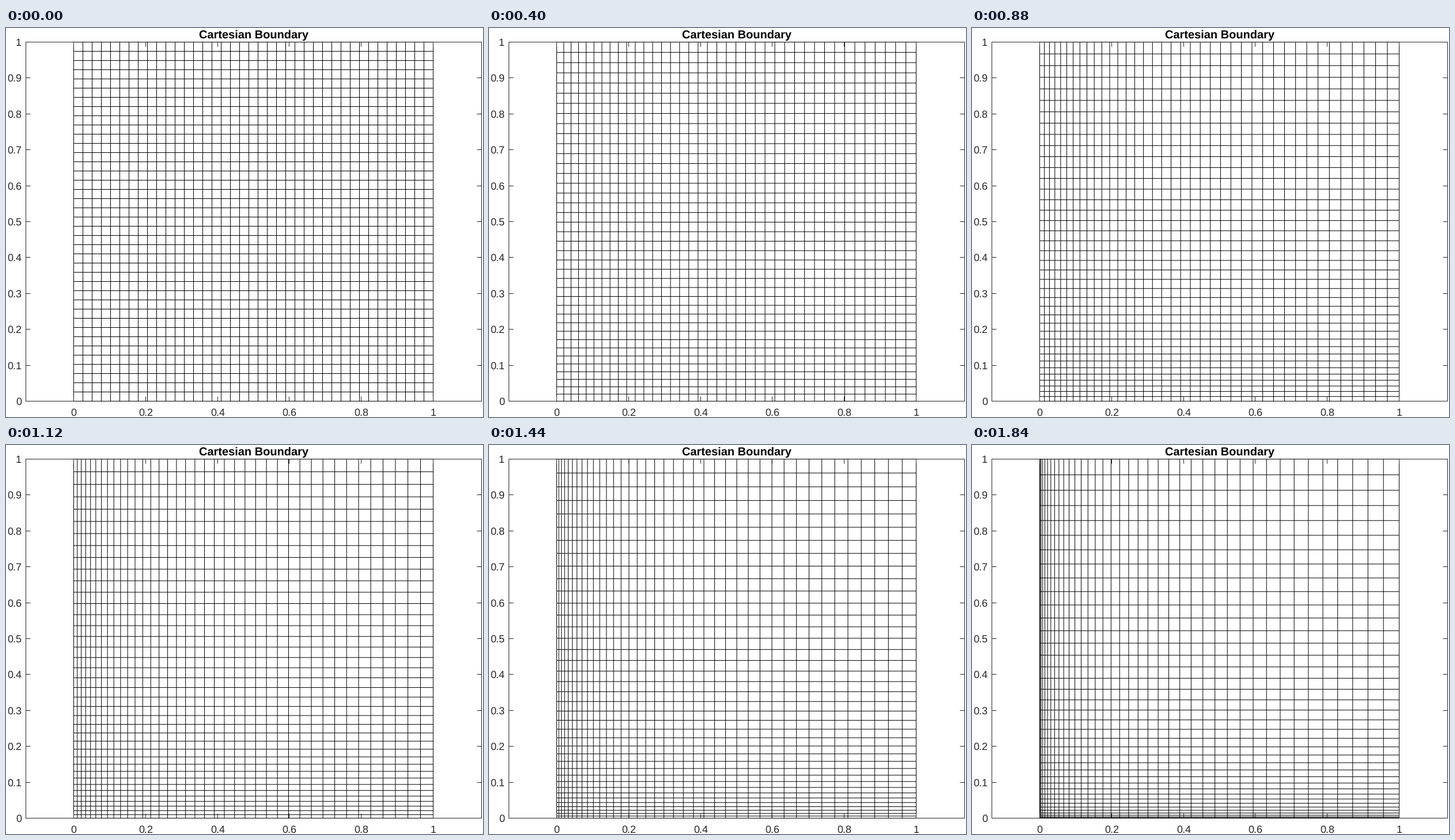
These frames come from a looping animation (828x676 px, 1920 ms). A matplotlib script:

```python
import numpy as np
import matplotlib.pyplot as plt
from matplotlib.animation import FuncAnimation

W, H, DPI = 828, 676, 64
PX = 72 / DPI                       # points per pixel
FRAMES, INTERVAL = 24, 80
CELLS = 39
LEFT, RIGHT, TOP, BOTTOM = 34.5, 825.5, 24.5, 648.5
X0, SIZE = 117.5, 624
INK = "#262626"

plt.rcParams["font.family"] = "Liberation Sans"
plt.rcParams["text.hinting"] = "none"
fig = plt.figure(figsize=(W / DPI, H / DPI), dpi=DPI, facecolor="white")
ax = fig.add_axes([0, 0, 1, 1])
ax.set_xlim(0, W)
ax.set_ylim(H, 0)
ax.axis("off")


def stroke(xs, ys, color, z):
    # Snapping would push half-pixel positions onto the next pixel.
    line, = ax.plot(xs, ys, color=color, lw=PX, zorder=z, snap=False,
                    solid_capstyle="butt", solid_joinstyle="miter")
    return line


def label(x, y, text, size, **kw):
    ax.text(x, y, text, fontsize=size * PX, va="baseline", **kw)


def spacing(t):
    """Node positions on [0, 1], drawn towards 0 as t grows."""
    u = np.linspace(0, 1, CELLS + 1)
    start = 1.15 - u + 0.34 * u**2
    end = 0.985 - 0.268 * u
    return u - t * u * (1 - u) * ((1 - t) * start + t * end)


def segments(pos, lo, hi):
    """Parallel lines at pos from lo to hi, separated by gaps."""
    gap = np.full_like(pos, np.nan)
    along = np.column_stack([pos, pos, gap]).ravel()
    across = np.tile([lo, hi, np.nan], len(pos))
    return along, across


# Axes box, inward ticks and labels
stroke([LEFT, RIGHT, RIGHT, LEFT, LEFT], [TOP, TOP, BOTTOM, BOTTOM, TOP], INK, 1)
for v in np.linspace(0, 1, 11):
    y = np.floor(BOTTOM - SIZE * v) + 0.5
    stroke([LEFT, LEFT + 8], [y, y], INK, 3)
    stroke([RIGHT - 8, RIGHT], [y, y], INK, 3)
    label(27, y + 6.5, f"{v:.1g}", 18, ha="right", color=INK)
for v in np.linspace(0, 1, 6):
    x = np.floor(X0 + SIZE * v) + 0.5
    stroke([x, x], [TOP, TOP + 8], INK, 3)
    stroke([x, x], [BOTTOM - 8, BOTTOM], INK, 3)
    label(x, 673.5, f"{v:.1g}", 18, ha="center", color=INK)
label(429.7, 17.5, "Cartesian Boundary", 20, ha="center",
      color="black", weight="bold")

columns = stroke([], [], "black", 2)
rows = stroke([], [], "black", 2)


def update(k):
    pos = SIZE * spacing(k / (FRAMES - 1))
    columns.set_data(*segments(X0 + pos, TOP, BOTTOM))
    y, x = segments(BOTTOM - pos, X0, X0 + SIZE)
    rows.set_data(x, y)
    return columns, rows


anim = FuncAnimation(fig, update, frames=FRAMES, interval=INTERVAL,
                     repeat=True, repeat_delay=0)
plt.show()
```
